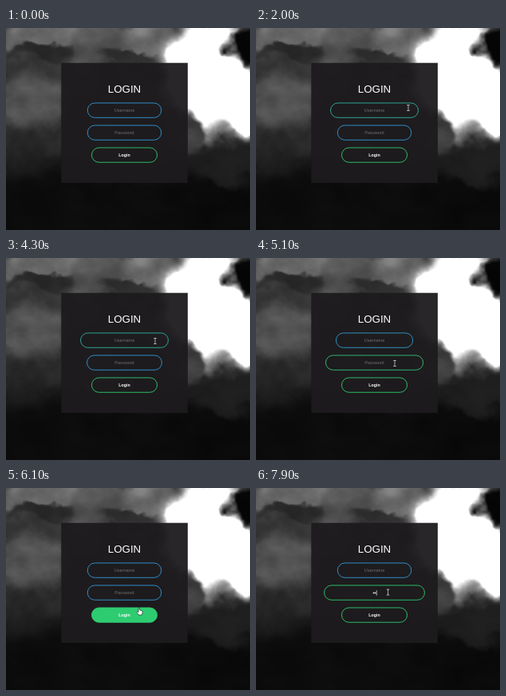
Write an HTML page with a canvas that moves like this. It is 306 by 253 pixels and loops after 8 s.

```html
<!DOCTYPE html>
<html lang="en">
<head>
<meta charset="utf-8">
<title>Login form</title>
<style>
html, body { margin: 0; width: 100%; height: 100%; overflow: hidden; background: #000; }
canvas { display: block; width: 306px; height: 253px; }
</style>
</head>
<body>
<canvas id="stage"></canvas>
<script>
const W = 306, H = 253, LOOP = 8000, FADE = 250, TRAVEL = 400;
const MID = 148.5, TALL = 19.2, ROWS = [93.5, 121.5, 149.5];
const BLUE = [52, 152, 219], GREEN = [46, 204, 113];
const FONT = '"Liberation Sans", Arial, sans-serif';

const dpr = window.devicePixelRatio || 1;
const canvas = document.getElementById('stage');
const ctx = canvas.getContext('2d');
canvas.width = W * dpr;
canvas.height = H * dpr;
ctx.scale(dpr, dpr);

const mix = (a, b, k) => a + (b - a) * k;
const clamp = x => Math.min(1, Math.max(0, x));
const smooth = x => x * x * (3 - 2 * x);

// Seeded value noise, 0 to 1
function hash(x, y) {
  let n = Math.imul(x, 374761393) + Math.imul(y, 668265263) + 97;
  n = Math.imul(n ^ (n >>> 13), 1274126177);
  return ((n ^ (n >>> 16)) >>> 0) / 2 ** 32;
}

function noise(x, y) {
  const i = Math.floor(x), j = Math.floor(y);
  const u = smooth(x - i), v = smooth(y - j);
  return mix(mix(hash(i, j), hash(i + 1, j), u), mix(hash(i, j + 1), hash(i + 1, j + 1), u), v);
}

function cloud(x, y) {
  let sum = 0;
  for (let o = 0; o < 4; o++) sum += noise(x * 2 ** o + o * 31, y * 2 ** o) / 2 ** (o + 1);
  return sum / 0.9375;
}

// Main masses of the sky: x, y, rx, ry, grey
const MASSES = [
  [50, 8, 55, 24, 100], [45, 30, 44, 12, 40], [30, 92, 58, 42, 88],
  [110, 20, 42, 38, 85], [175, 12, 38, 30, 112], [155, 32, 40, 10, 55],
  [255, 55, 62, 88, 255], [302, 95, 42, 46, 250], [232, 126, 20, 30, 60],
  [280, 170, 66, 28, 26], [304, 20, 28, 27, 6]
];

function shade(x, y) {
  const puff = cloud(x / 42, y / 30);
  const wx = x + 36 * (cloud(x / 30 + 50, y / 30) - 0.5);
  const wy = y + 36 * (cloud(x / 30, y / 30 + 50) - 0.5);
  let v = mix(52, 11, smooth(clamp((wy - 120) / 80)));
  for (const [cx, cy, rx, ry, grey] of MASSES) {
    const d = Math.hypot((wx - cx) / rx, (wy - cy) / ry);
    v = mix(v, grey, smooth(clamp((1.1 - d) / 0.5)));
  }
  return v * (0.6 + 0.8 * puff) + Math.max(0, v - 170) * 0.5;
}

function paintSky() {
  const c = document.createElement('canvas');
  c.width = W;
  c.height = H;
  const g = c.getContext('2d');
  const img = g.createImageData(W, H);
  for (let i = 0; i < W * H; i++) {
    img.data.fill(shade(i % W, Math.floor(i / W)), i * 4, i * 4 + 3);
    img.data[i * 4 + 3] = 255;
  }
  g.putImageData(img, 0, 0);
  return c;
}

// cubic-bezier(.25, .1, .25, 1)
function ease(x) {
  if (x <= 0) return 0;
  if (x >= 1) return 1;
  const curve = (s, a, b) => 3 * a * s * (1 - s) ** 2 + 3 * b * s * s * (1 - s) + s ** 3;
  let lo = 0, hi = 1;
  for (let i = 0; i < 20; i++) {
    const m = (lo + hi) / 2;
    if (curve(m, 0.25, 0.25) < x) lo = m; else hi = m;
  }
  return curve(lo, 0.1, 1);
}

// Times alternate between switching on and switching off
const USER = [1925, 2950, 4225, 4950];
const PASS = [2950, 4115, 4950, 5475, 6575];
const HOVER = [5590, 6570];

function level(times, t) {
  let v = 0;
  times.forEach((at, i) => {
    if (t >= at) {
      const e = ease((t - at) / FADE);
      v = i % 2 ? 1 - e : e;
    }
  });
  return v;
}

// Pointer stops: arrival time, x, y
const STOPS = [
  [100, 302, 142], [1000, 272, 155], [1950, 191, 100], [3000, 181, 136],
  [4250, 187, 104], [4950, 174, 132], [5590, 167, 150], [6600, 165.5, 130.5]
];

function pointer(t) {
  if (t < STOPS[0][0]) return null;
  let [, x, y] = STOPS[0];
  for (const [at, px, py] of STOPS) {
    const k = smooth(clamp((t - at) / TRAVEL + 1));
    x = mix(x, px, k);
    y = mix(y, py, k);
  }
  return [x, y];
}

function text(str, y, font, color) {
  ctx.font = `${font} ${FONT}`;
  ctx.fillStyle = color;
  ctx.textAlign = 'center';
  ctx.fillText(str, MID, y);
}

function pill(y, width, color, fill = 'transparent') {
  const line = 0.9;
  ctx.beginPath();
  ctx.roundRect(MID - width / 2 + line / 2, y + line / 2, width - line, TALL - line, (TALL - line) / 2);
  ctx.fillStyle = fill;
  ctx.fill();
  ctx.lineWidth = line;
  ctx.strokeStyle = color;
  ctx.stroke();
}

const fieldWidth = k => mix(93.4, 126.8, k);

function field(y, k) {
  const rgb = BLUE.map((b, i) => Math.round(mix(b, GREEN[i], k)));
  pill(y, fieldWidth(k), `rgb(${rgb})`);
}

function typed(n) {
  const step = 2, left = MID - n * step / 2;
  ctx.fillStyle = '#fff';
  for (let i = 0; i < n; i++) {
    ctx.beginPath();
    ctx.arc(left + step * (i + 0.5), 131.4, 0.85, 0, 7);
    ctx.fill();
  }
  ctx.fillRect(left + n * step + 0.3, 128.2, 0.7, 6.3);
}

function beam() {
  ctx.fillStyle = '#d0d0d0';
  ctx.fillRect(-0.4, -3.5, 0.8, 7);
  ctx.fillRect(-1.8, -3.9, 3.6, 0.8);
  ctx.fillRect(-1.8, 3.1, 3.6, 0.8);
}

function outline(path) {
  const p = new Path2D(path);
  ctx.fillStyle = '#fff';
  ctx.strokeStyle = '#111';
  ctx.lineWidth = 0.6;
  ctx.fill(p);
  ctx.stroke(p);
}

const arrow = () => outline('M0 0V8.4L2 6.6 3.3 9.4 4.5 8.8 3.2 6.1 5.9 6Z');
const hand = () => outline('M-.8 0H.5L.8 3 3.8 3.8 4.2 5 3.6 9H-.6L-3.2 5.4-2.4 4.6-.9 5.8Z');

function drawPointer(t, user, pass) {
  const at = pointer(t);
  if (!at) return;
  const [x, y] = at;
  const within = (top, width) => y > top && y < top + TALL && Math.abs(x - MID) < width / 2;
  ctx.save();
  ctx.translate(x, y);
  if (within(ROWS[2], 83)) hand();
  else if (within(ROWS[0], fieldWidth(user)) || within(ROWS[1], fieldWidth(pass))) beam();
  else arrow();
  ctx.restore();
}

const sky = paintSky();

function draw(t) {
  const user = level(USER, t), pass = level(PASS, t), hover = level(HOVER, t);
  ctx.drawImage(sky, 0, 0, W, H);
  ctx.fillStyle = 'rgba(29,27,29,.95)';
  ctx.fillRect(69.3, 43.7, 158.6, 150.3);
  text('LOGIN', 81.2, '13.34px', '#fff');

  field(ROWS[0], user);
  text('Username', 105.2, '5.56px', '#707070');

  field(ROWS[1], pass);
  if (t < 7700) text('Password', 133.2, '5.56px', '#707070');
  else typed(t < 7900 ? 1 : 2);

  pill(ROWS[2], 83, `rgb(${GREEN})`, `rgba(${GREEN},${hover})`);
  text('Login', 161.2, 'bold 5.3px', '#fff');

  drawPointer(t, user, pass);
}

const start = performance.now();
function tick() {
  draw((performance.now() - start) % LOOP);
  requestAnimationFrame(tick);
}
tick();
</script>
</body>
</html>
```
